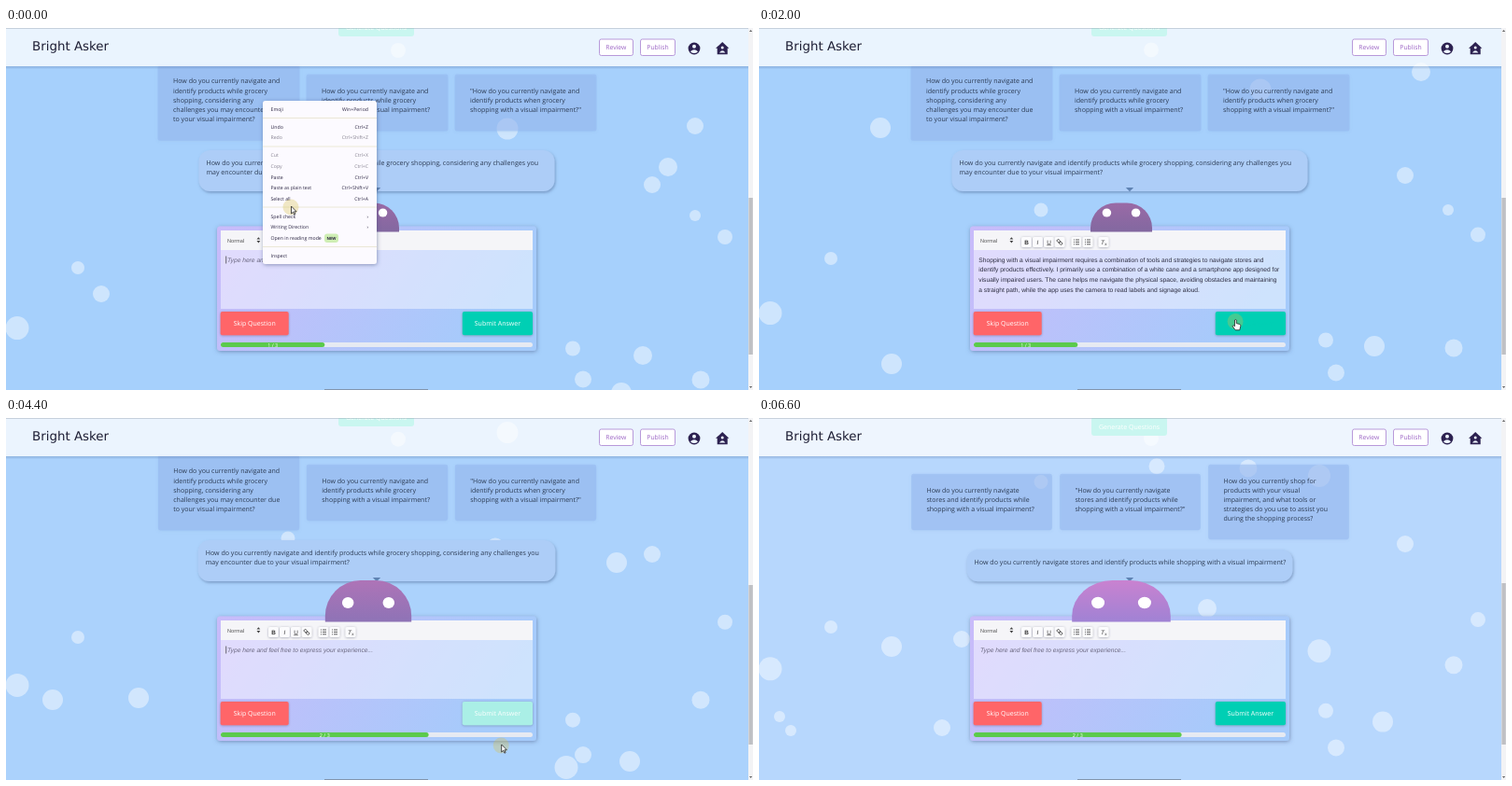
Write an HTML page that moves like this. It is 800 by 388 pixels and loops after 6700 ms.

```html
<!DOCTYPE html>
<html lang="en">
<head>
<meta charset="utf-8">
<title>Survey demo</title>
<style>
  html, body { margin: 0; width: 100%; height: 100%; overflow: hidden; background: #a6d0fc; }
  svg { display: block; width: 100vw; height: 100vh; }
  text { font-family: "Open Sans", "Noto Sans", sans-serif; font-size: 7.05px; fill: #2b3a52; text-rendering: geometricPrecision; white-space: pre; }
  .brand { font: 13.4px "DejaVu Sans", sans-serif; fill: #1d1d33; }
  .nav { font-size: 6.8px; fill: #9a63c4; text-anchor: middle; }
  .edit { font: 6.68px "Liberation Sans", sans-serif; fill: #2d2d40; }
  .hint { font-style: italic; fill: #6b6880; }
  .tool { font: 6.4px "Liberation Sans", sans-serif; fill: #333; text-anchor: middle; }
  .btn { font-size: 7px; fill: #fff; text-anchor: middle; }
  .item { font-size: 5.2px; fill: #2a2440; }
  .off { fill: #85818f; }
  .end { text-anchor: end; }
  .icon { fill: none; stroke: #333; stroke-width: .8; }
</style>
</head>
<body>
<svg id="stage" viewBox="0 0 800 388" preserveAspectRatio="none"></svg>
<script>
const LOOP = 6700, STEP = 100, LINE = 10.15;
const PASTE = 1.1, HOVER = 2, SUBMIT = 3.5, LEAVE = 4.3, NEXT = 5.8;

// x, y at time 0, rise per second, radius, from, until
const bubbles = [
  [12, 321.6, 8, 12.5], [77, 257, 5, 7], [142, 410, 25, 11], [607, 343.5, 4.5, 8],
  [618, 376.5, 3.5, 9], [659, 391, 25, 11, 0, 3.5], [654, 419, 60, 11, 3.5, 4.6],
  [692, 168, 5, 9], [770, 224, 1.2, 8], [744, 377, 17, 9.5], [668, 453, 19.3, 11],
  [600, 624, 56.7, 12.5], [600, 1217, 175, 12], [302, 250, 27.5, 7.5], [426, 335.6, 43, 8.5],
  [524, 306, 38.2, 9.5], [537, 108, 21, 11.5], [709, 149, 51, 10], [130, 243, 68, 11, .5],
  [738, 201, 3, 6, 0, 2.6], [50, 566, 60, 11, 4.2, 6], [217, 963, 110, 9], [196, 1058, 110, 9],
  [22, 650, 50, 6], [34, 665, 50, 6], [480, 930, 110, 10], [420, 24, .3, 8],
  [102, 285, 55, 9, 0, .5], [682, 351, 30, 10, 0, .5], [738, 105, 60, 9, 0, .5], [376, 314, 1, 11]
];

const ask = "How do you currently navigate ";
const rounds = [
  {
    mid: 80, left: 206.5, top: 131,
    cards: [
      [ask + "and", "identify products while grocery", "shopping, considering any", "challenges you may encounter due", "to your visual impairment?"],
      [ask + "and", "identify products while grocery", "shopping with a visual impairment?"],
      ["\"" + ask + "and", "identify products when grocery", "shopping with a visual impairment?\""]
    ],
    said: [ask + "and identify products while grocery shopping, considering any challenges you", "may encounter due to your visual impairment?"]
  },
  {
    mid: 90, left: 224, top: 141,
    cards: [
      [ask.trim(), "stores and identify products while", "shopping with a visual impairment?"],
      ["\"" + ask.trim(), "stores and identify products while", "shopping with a visual impairment?\""],
      ["How do you currently shop for", "products with your visual", "impairment, and what tools or", "strategies do you use to assist you", "during the shopping process?"]
    ],
    said: [ask + "stores and identify products while shopping with a visual impairment?"]
  }
];

const answer = [
  "Shopping with a visual impairment requires a combination of tools and strategies to navigate stores and",
  "identify products effectively. I primarily use a combination of a white cane and a smartphone app designed for",
  "visually impaired users. The cane helps me navigate the physical space, avoiding obstacles and maintaining",
  "a straight path, while the app uses the camera to read labels and signage aloud."
];

// label, shortcut, y, greyed
const items = [
  ["Emoji", "Win+Period", 87], ["Undo", "Ctrl+Z", 106], ["Redo", "Ctrl+Shift+Z", 117.5, 1],
  ["Cut", "Ctrl+X", 136.5, 1], ["Copy", "Ctrl+C", 148, 1], ["Paste", "Ctrl+V", 160],
  ["Paste as plain text", "Ctrl+Shift+V", 171.5], ["Select all", "Ctrl+A", 183],
  ["Spell check", "›", 202], ["Writing Direction", "›", 213.5], ["Open in reading mode", "", 225], ["Inspect", "", 244]
];

const rect = (x, y, w, h, r, fill, more = "") =>
  `<rect x="${x}" y="${y}" width="${w}" height="${h}" rx="${r}" fill="${fill}" ${more}/>`;
const text = (x, y, s, cls = "", more = "") => `<text x="${x}" y="${y}" class="${cls}" ${more}>${s}</text>`;
const lines = (x, y, list, gap, cls) => list.map((s, i) => text(x, y + i * gap, s, cls)).join("");
const stops = (id, a, b, dir) =>
  `<linearGradient id="${id}" ${dir}><stop offset="0" stop-color="${a}"/><stop offset="1" stop-color="${b}"/></linearGradient>`;
const shadow = (id, dx, dy, blur, color, alpha) =>
  `<filter id="${id}" x="-20%" y="-30%" width="140%" height="170%"><feDropShadow dx="${dx}" dy="${dy}" stdDeviation="${blur}" flood-color="${color}" flood-opacity="${alpha}"/></filter>`;

function drawRound(r, i) {
  const cards = r.cards.map((list, n) => {
    const h = 30.5 + LINE * list.length, top = r.mid - h / 2, x = 162.5 + 159 * n;
    return `<g class="card" data-x="${x + 76}" data-y="${r.mid}">` +
      rect(x, top, 152, h, 2.5, "#94b6ee", 'fill-opacity=".55" filter="url(#soft)"') +
      lines(x + 16.5, top + 20, list, LINE) + "</g>";
  }).join("");
  const box = `<g class="said">` +
    rect(r.left, r.top, 2 * (397 - r.left), 175 - r.top, 12, "#adcdf7", 'filter="url(#drop)"') +
    lines(r.left + 8, 157.4 - LINE * (r.said.length - 1), r.said, LINE) + "</g>";
  const top = rect(356, r.mid - 91, 81, 20, 3, "#1fdcc0") +
    text(396.5, r.mid - 78, "Generate Questions", "btn");
  return `<g id="round${i}">${top}${cards}${box}</g>`;
}

function drawTools() {
  const key = x => rect(x, 224, 11, 11, 1.8, "#fbfbfd", 'filter="url(#key)"');
  const list = x => [0, 1, 2].map(i => `<path class="icon" d="M${x} ${227 + i * 2.4}h1M${x + 2} ${227 + i * 2.4}h4"/>`).join("");
  return rect(230, 217, 334, 21, 0, "#f5f5f8") +
    text(237, 229.5, "Normal", "tool", 'style="text-anchor:start;font-size:5.6px;fill:#555"') +
    `<path d="M268.5 226.6l1.9-2.4 1.9 2.4zM268.5 228l1.9 2.4 1.9-2.4z" fill="#444"/>` +
    [281, 293, 305, 316.5, 334.5, 346.5, 363.5].map(key).join("") +
    text(286.5, 232, "B", "tool", 'style="font-weight:bold"') +
    text(298.5, 232, "I", "tool", 'style="font-style:italic"') +
    text(310.5, 231.5, "U", "tool", 'text-decoration="underline"') +
    `<g class="icon" transform="rotate(45 322 229.5)"><rect x="318.5" y="228.2" width="3.6" height="2.6" rx="1.2"/><rect x="321.8" y="228.2" width="3.6" height="2.6" rx="1.2"/></g>` +
    list(337) + list(349) +
    text(368, 231.8, "T", "tool", 'style="font-style:italic"') + text(371.3, 232.8, "x", "tool", 'style="font-size:4.5px"');
}

function drawMenu() {
  const rows = items.map(([a, b, y, off]) =>
    text(283.5, y + 1.9, a, off ? "item off" : "item") + text(388, y + 1.9, b, off ? "item end off" : "item end")).join("");
  const rules = [96.5, 127, 192, 234.5].map(y => `<path d="M275 ${y}h122" stroke="#e9e6d2" stroke-width=".9"/>`).join("");
  return `<g id="menu">${rect(275, 78, 122, 175, 3, "#fcfaff", 'filter="url(#pop)"')}` +
    rect(275, 154, 122, 12, 0, "#ebebee", 'id="row"') + rules + rows +
    rect(341, 220.5, 15, 9.5, 3, "#cfeeb4") +
    text(348.5, 227, "NEW", "item", 'style="font-size:4.3px;font-weight:700;text-anchor:middle"') + "</g>";
}

const header =
  rect(0, 0, 795, 41, 0, "#fff", 'fill-opacity=".76"') +
  rect(0, 41, 795, 3.5, 0, "url(#edge)") +
  `<path d="M0 .4H795" stroke="#8b95a5" stroke-width=".7" opacity=".6"/>` +
  text(28, 24, "Bright Asker", "brand") +
  rect(635.5, 12, 36, 17.5, 2, "#fff", 'stroke="#b28fd6" stroke-width=".9"') + text(653.3, 23, "Review", "nav") +
  rect(679.5, 12, 37, 17.5, 2, "#fff", 'stroke="#b28fd6" stroke-width=".9"') + text(698, 23, "Publish", "nav") +
  `<g fill="#2c2150"><circle cx="737" cy="22" r="6.4"/><path d="M760 21.8l7.2-6.8 7.2 6.8h-1.7v6.5h-11v-6.5z"/></g>
   <g fill="#eef5fe"><circle cx="737" cy="19.8" r="2"/><path d="M732.9 25.2q4.1-4 8.2 0q-4.1 3.8-8.2 0z"/>
   <circle cx="767.2" cy="21" r="1.5"/><path d="M764 26.4q3.2-4.4 6.4 0z"/></g>`;

const scrollbar = rect(795, 0, 5, 388, 0, "#f3f3f5") + rect(795.4, 182, 4.4, 168, 0, "#bfc0c4", 'id="thumb"') +
  `<path d="M796 4l1.6-2 1.6 2zM796 384l1.6 2 1.6-2z" fill="#666"/>`;

const panel =
  rect(226, 212.5, 342, 133.5, 3.5, "url(#panel)", 'filter="url(#pop)"') +
  rect(230, 238, 334, 63, 0, "#fff", 'fill-opacity=".45"') + drawTools() +
  `<g id="answer">${lines(235.3, 250.6, answer, 10.8, "edit")}</g>
   <g id="hint">${text(237, 250.6, "Type here and feel free to express your experience...", "edit hint")}
   <path id="caret" d="M235.7 244.5v8" stroke="#333" stroke-width=".7"/></g>` +
  rect(229.7, 304, 73, 25.2, 2, "#ff6567", 'filter="url(#key)"') + text(266.3, 319.2, "Skip Question", "btn") +
  rect(488.8, 304, 75.2, 25.2, 2, "#00cfb4", 'id="submit" filter="url(#key)"') + text(526.4, 319.2, "Submit Answer", "btn", 'id="label"') +
  rect(230, 337, 334, 5, 2.5, "#e6eaf2") + rect(230, 337, 111, 5, 2.5, "#5bca4c", 'id="bar"') +
  text(286, 341.6, "1 / 3", "btn", 'id="count" style="font-size:5.4px"');

const hand = "M-1.6-4.5q1-1 1.8 0v3.6l3.6.9q1.2.5.9 2l-1 4.3h-4.6l-3-4q.2-1.4 1.4-.8l.9.8z";
const arrow = "M-.5-4v8l1.9-1.7 1.3 2.9 1.2-.6-1.3-2.8h2.5z";

const stage = document.getElementById("stage");
stage.innerHTML = `<defs>
  ${stops("panel", "#c9bbfa", "#a5cbfb", 'x1="0" y1="0" x2="1" y2=".25"')}
  ${stops("edge", "rgba(70,100,150,.28)", "rgba(70,100,150,0)", 'x1="0" y1="0" x2="0" y2="1"')}
  ${stops("skin", "#9a6aa6", "#86699f", 'x1="0" y1="0" x2="0" y2="1"')}
  ${shadow("soft", 0, 1, 1.4, "#5b80bd", .18)} ${shadow("drop", 1, 1.6, 1.4, "#44628f", .5)}
  ${shadow("pop", .5, 1, 2, "#3d4c78", .5)} ${shadow("key", 0, .5, .9, "#39405a", .45)}
  </defs>
  ${rect(0, 0, 800, 388, 0, "#a6d0fc", 'id="sky"')}
  <g fill="#fff" fill-opacity=".45">${bubbles.map(b => `<circle class="bubble" cx="${b[0]}" r="${b[3]}"/>`).join("")}</g>
  ${rounds.map(drawRound).join("")}
  <path d="M392.8 171h8.4l-4.2 4.2z" fill="#5f83b3"/>
  ${panel}
  <path id="head" fill="url(#skin)"/><ellipse class="eye" fill="#fff"/><ellipse class="eye" fill="#fff"/>
  ${header}${scrollbar}
  ${rect(341, 387, 111, 1, 0, "#8295ad")}
  ${drawMenu()}
  <g id="cursor"><circle cx="-1" cy="-3" r="8.5" fill="#d6c04a" fill-opacity=".32"/>
  <path id="tip" fill="#fff" stroke="#222" stroke-width=".8"/></g>`;

const $ = id => document.getElementById(id);
const all = q => [...stage.querySelectorAll(q)];
const set = (el, attrs) => { for (const k in attrs) el.setAttribute(k, attrs[k]); };
const show = (el, on) => el.setAttribute("visibility", on ? "inherit" : "hidden");
const mix = (a, b, k) => a + (b - a) * k;
const rgb = (a, b, k) => `rgb(${a.map((v, i) => Math.round(mix(v, b[i], k)))})`;

// Linear track through [time, value] points
function track(points, t) {
  const i = points.findIndex(p => p[0] > t);
  if (i < 0) return points[points.length - 1][1];
  if (i === 0) return points[0][1];
  const [a, u] = points[i - 1], [b, v] = points[i];
  return mix(u, v, (t - a) / (b - a));
}

const dots = all(".bubble"), cards = all(".card"), saids = all(".said"), eyes = all(".eye");
const [skinTop, skinEnd] = all("#skin stop");
const cursorX = [[0, 306], [.4, 308], [1.2, 308], [1.8, 511], [4.2, 512], [4.7, 560]];
const cursorY = [[0, 195], [.4, 163], [1.2, 163], [1.8, 317], [3, 320], [4.2, 320], [4.7, 405]];

function drawHead(t, pulse) {
  const w = track([[SUBMIT - .2, 66], [3.8, 90], [5.1, 91], [6.6, 102]], t) + 5.5 * pulse;
  const top = track([[SUBMIT - .2, 187.5], [3.8, 174]], t);
  const h = 218.5 - top, rx = w * .41, ry = h * .86, l = 388 - w / 2;
  set($("head"), { d: `M${l} 218.5V${top + ry}A${rx} ${ry} 0 0 1 ${l + rx} ${top}H${l + w - rx}A${rx} ${ry} 0 0 1 ${l + w} ${top + ry}V218.5Z` });
  const ey = track([[3.3, 198], [3.8, 190], [4.4, 198]], t);
  eyes.forEach((e, i) => set(e, { cx: 388 + (i ? 1 : -1) * w * .236, cy: ey, rx: 1 + w * .057, ry: Math.min(1 + w * .054, 6.2) }));
  const glow = track([[3.8, 0], [5.1, .9], [6.6, 1]], t);
  set(skinTop, { "stop-color": rgb([154, 106, 166], [201, 130, 208], glow) });
  set(skinEnd, { "stop-color": rgb([130, 104, 160], [160, 130, 212], glow) });
}

function draw(t) {
  const pulse = (1 - Math.cos(Math.PI * t)) / 2, second = t >= NEXT;
  const light = track([[3.8, 0], [5.1, .6], [6.6, 1]], t);
  set($("sky"), { fill: rgb([166, 208, 252], [183, 215, 253], light) });

  dots.forEach((d, i) => {
    const [, y, rise, , from = 0, until = 9] = bubbles[i];
    set(d, { cy: y - rise * t });
    show(d, t >= from && t < until);
  });

  rounds.forEach((r, i) => show($("round" + i), second === (i === 1)));
  cards.forEach(c => {
    const { x, y } = c.dataset;
    set(c, { transform: `translate(${x} ${y}) scale(${1 - .012 * pulse}) translate(${-x} ${-y})` });
  });
  saids.forEach(s => set(s, { transform: `translate(397 153) scale(${1 + .013 * pulse}) translate(-397 -153)` }));
  const thumb = second ? 177 : t >= SUBMIT ? 179 : 182;
  set($("thumb"), { y: thumb, height: 350 - thumb });
  drawHead(t, pulse);

  const typed = t >= PASTE && t < SUBMIT;
  show($("answer"), typed);
  show($("hint"), !typed);
  show($("caret"), !typed && !second);
  show($("menu"), t < PASTE);
  show($("row"), t >= .3);

  const over = t >= HOVER && t < LEAVE;
  set($("submit"), { fill: rgb([0, 207, 180], [255, 255, 255], track([[HOVER, 0], [2.3, 1], [LEAVE, 1], [4.6, 0]], t)) });
  $("label").style.fill = over ? "#00cfb4" : "#fff";

  const p = Math.min(Math.max((t - SUBMIT) / .6, 0), 1);
  const w = 111.3 * (2 - Math.pow(1 - p, 1.5));
  set($("bar"), { width: w });
  set($("count"), { x: 230 + w / 2 });
  $("count").textContent = t < SUBMIT ? "1 / 3" : "2 / 3";

  set($("cursor"), { transform: `translate(${track(cursorX, t)} ${track(cursorY, t)})` });
  set($("tip"), { d: over ? hand : arrow });
  show($("cursor"), t < 4.8);
}

const start = performance.now();
function tick() {
  const ms = (performance.now() - start) % LOOP;
  draw(Math.floor(ms / STEP) * STEP / 1000);
  requestAnimationFrame(tick);
}
tick();
</script>
</body>
</html>
```
